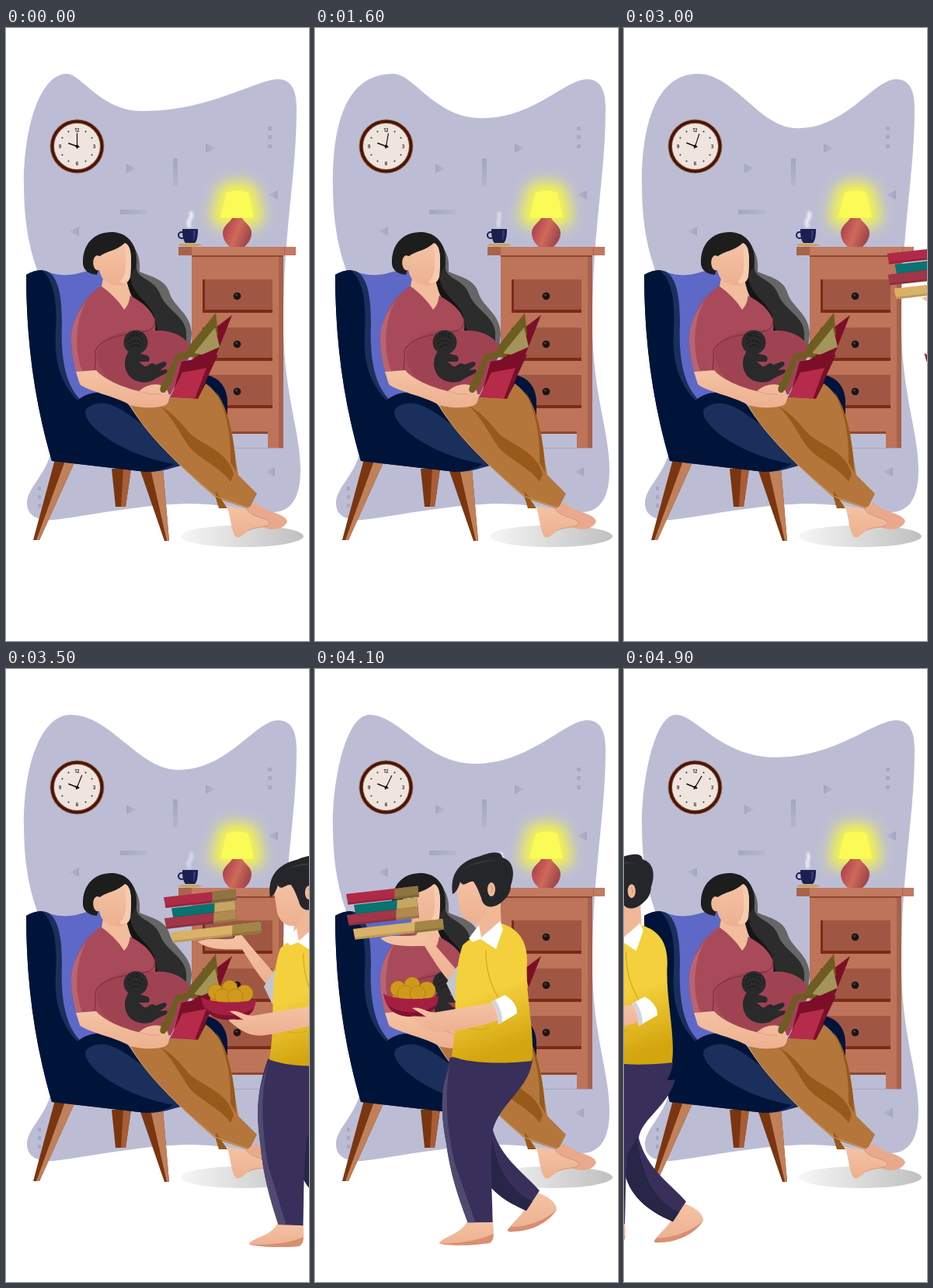
An HTML page that plays this animation: 390x790 px, repeating every 5000 ms.

```html
<!DOCTYPE html>
<html lang="en">
<head>
<meta charset="utf-8">
<title>Reading at home</title>
<style>
html, body { margin: 0; width: 100%; height: 100%; overflow: hidden; background: #fff; }
svg { display: block; width: 100vw; height: 100vh; }
text { font: bold 5.5px Inter, Arial, sans-serif; text-anchor: middle; fill: #222; }
</style>
</head>
<body>
<svg viewBox="0 0 390 790">
<defs>
  <linearGradient id="fade"><stop stop-color="#a4a6bf"/><stop offset="1" stop-color="#b6b7d0"/></linearGradient>
  <linearGradient id="fadeV" x2="0" y2="1"><stop stop-color="#a4a6bf"/><stop offset="1" stop-color="#b3b4ce"/></linearGradient>
  <linearGradient id="vase" y2=".4"><stop stop-color="#a3344b"/><stop offset=".6" stop-color="#cf6a5a"/><stop offset="1" stop-color="#a2494b"/></linearGradient>
  <linearGradient id="floor"><stop stop-color="#f6f6f6"/><stop offset="1" stop-color="#c0c0c0"/></linearGradient>
  <linearGradient id="skin" x2="0" y2="1"><stop stop-color="#f4c3a4"/><stop offset="1" stop-color="#edb090"/></linearGradient>
  <linearGradient id="gold" x2=".2" y2="1"><stop offset=".55" stop-color="#f4d03c"/><stop offset="1" stop-color="#d3a50f"/></linearGradient>
  <filter id="soft" x="-1" y="-1" width="3" height="3"><feGaussianBlur stdDeviation="1.5"/></filter>
  <filter id="halo" x="-2" y="-2" width="5" height="5"><feGaussianBlur stdDeviation="9"/></filter>
  <g id="drawer">
    <path fill="#7a2b17" d="M253 324h90v43h-90z"/><path fill="#9f5743" d="M256 324h87v39h-87z"/>
    <circle cx="297.5" cy="345.5" r="4.8" fill="#1c1514"/><circle cx="296.5" cy="344" r="1.6" fill="#4d3a36"/>
  </g>
  <path id="tri" fill="url(#fade)" d="M-6-6 7 0-6 6z"/>
  <path id="shade" d="M284 212q14-5 28 0l7 32q-21 2-43 0z"/>
</defs>

<path id="wall" fill="#bcbdd5"/>
<g id="deco">
  <use href="#tri" x="161" y="181"/><use href="#tri" x="263" y="155"/>
  <use href="#tri" transform="translate(88 262)rotate(180)"/>
  <use href="#tri" transform="translate(344 215)rotate(180)"/>
  <use href="#tri" transform="translate(340 572)rotate(180)"/>
  <path fill="url(#fadeV)" d="M215 168h6v36h-6z"/><path fill="url(#fade)" d="M147 234h35v6h-35z"/>
  <path fill="#a6a8c1" d="M337 127h5v5h-5zM337 138h5v5h-5zM337 150h5v5h-5zM41 591h4v5h-4zM41 602h4v5h-4zM41 613h4v5h-4z"/>
</g>

<g transform="translate(91.5 152.5)">
  <circle r="35" fill="#a8704f"/><circle r="34" fill="#45160d"/><circle r="30.500" fill="#8d4a32"/><circle r="29.500" fill="#efe4de"/>
  <g id="ticks" fill="#333"></g>
  <text y="-19">12</text><text x="22" y="2">3</text><text y="24">6</text><text x="-22" y="2">9</text>
  <path id="hour" stroke="#111" stroke-width="1.6" d="M0 3V-12"/>
  <path id="minute" stroke="#111" stroke-width="1.2" d="M0 3V-17"/><circle r="2" fill="#111"/>
</g>

<g>
  <path stroke="#a3a4bd" d="M284 541.5h74"/>
  <path fill="#bd7459" d="M239 290h118v251h-20v-18h-98z"/>
  <path fill="#a8614a" d="M351 293h6v248h-6z"/>
  <path fill="#8f4630" d="M239 292h118v3h-118zM239 520h98v3h-98z"/>
  <path fill="#c27a60" d="M222 282h151v11h-151z"/><path fill="#aa634b" d="M222 282h17v11h-17zM358 282h1v11h-1z"/>
  <use href="#drawer"/><use href="#drawer" y="62"/><use href="#drawer" y="123"/>
</g>

<use href="#shade" fill="#f3f350" stroke="#f3f350" stroke-width="24" stroke-linejoin="round" filter="url(#halo)"/>
<path fill="url(#vase)" d="M291 244h13c0 5 12 10 12 20 0 9-5 14-9 18h-19c-4-4-9-9-9-18 0-10 12-15 12-20z"/>
<use href="#shade" fill="#fbfb58"/>

<path id="steam" fill="none" stroke="#fff" stroke-width="5" opacity=".6" filter="url(#soft)"/>
<ellipse cx="237" cy="279.500" rx="15" ry="2" fill="#c6a363"/>
<circle cx="226" cy="267" r="4" fill="none" stroke="#1b1f50" stroke-width="2"/>
<path fill="#1b1f50" d="M227 259h20c0 9-1 15-4 18h-12c-3-3-4-9-4-18z"/><path fill="#343a78" d="M241 261h3q0 9-3 14z"/>

<ellipse cx="304" cy="655" rx="79" ry="14" fill="url(#floor)"/>

<g>
  <path fill="#7a3610" d="M136 568h25l-7 49h-13z"/><path fill="#a85d35" d="M151 568h10l-7 49h-6z"/>
  <path fill="#7a3610" d="M172 568h30l8 93h-6z"/><path fill="#c08059" d="M186 568h16l8 93h-3z"/>
  <path fill="#7a3610" d="M63 556 88 560 43 660h-8z"/><path fill="#c08059" d="M76 558 88 560 43 660h-4z"/>
  <path fill="#5e68c6" d="M48 312C85 328 100 309 125 310L155 340 150 500 97 485 65 440z"/>
  <path fill="#00133c" d="M250 447C273 446 285 463 285 482V520L255 530z"/>
  <path fill="#1a2f5c" d="M26 318C36 312 46 311 54 314 68 322 72 348 72 380 70 430 78 462 97 480 113 465 143 465 160 488 178 518 205 538 240 560L214 567Q200 572 180 572L59 558C36 480 26 400 26 318z"/>
  <path fill="#001439" d="M26 318C32 314 40 312 46 312 62 326 66 352 64 390 62 425 68 455 92 480 108 465 140 465 158 486 168 502 178 512 190 522 160 500 130 470 104 490 92 505 140 548 216 562Q200 572 180 572L59 558C36 480 26 400 26 318z"/>
</g>

<g>
  <path fill="#666" d="M150 270C172 283 173 300 172 314 183 320 206 322 211 343 217 360 238 368 239 394L237 412 200 402z"/>
  <path fill="#2c2c2c" d="M140 264C163 268 170 285 168 306 166 324 190 322 198 342 205 363 230 370 232 392L232 410 198 404 190 380C173 362 162 350 155 326z"/>
  <path fill="#151515" d="M160 320C162 345 185 352 191 372 194 385 196 395 200 405L190 400 188 382C173 362 160 350 155 326z"/>
  <path fill="#a94a5a" d="M123 332C102 345 86 370 84 400 84 418 88 432 90 443L116 441 117 450C140 466 180 474 212 470L238 418C236 400 217 389 192 390 195 372 184 358 160 345z"/>
  <path fill="#bb6471" d="M105 350C90 368 84 385 84 400 84 418 88 432 90 443L98 442C86 410 91 370 105 350z"/>
  <path fill="#9f4353" d="M117 418C130 388 162 388 192 390 218 389 238 402 239 418L212 472C170 476 116 460 117 418z"/>
  <path fill="none" stroke="#84303f" stroke-width="1.3" d="M114 441Q116 428 115 416C125 394 160 396 183 390Q194 386 191 373"/>
  <path fill="#f2bd9c" d="M125 322 123 333C133 340 144 350 152 363 158 357 159 350 160 343L155 325z"/>
  <path fill="#1d1d1d" d="M99 304C98 276 116 262 138 263 160 265 169 281 167 308L158 320 122 300 117 318C107 317 100 313 99 304z"/>
  <path fill="url(#skin)" d="M121 294C128 288 143 287 153 277 162 280 162 298 160 320 158 331 146 334 138 331 128 329 122 322 120 312 112 315 109 296 117 293z"/>
  <path fill="#f6cbb0" d="M153 278C162 280 162 300 160 320 157 331 146 331 147 326 157 318 154 300 153 278z"/>
</g>

<g fill="#2a2a2b">
  <circle cx="167" cy="405" r="15.500"/>
  <path d="M161 413C150 425 151 440 160 450 170 459 186 458 192 452L204 446Q209 444 207 440L198 441 206 435Q208 430 203 430L192 434C186 428 183 438 178 436L171 430 183 430Q187 425 182 422L174 420z"/>
  <path fill="none" stroke="#000" stroke-width=".9" stroke-dasharray="2 2" d="M157 402q9-11 20 0M158 407q9-9 18 1M160 396q7-5 14 0M161 411q6-5 12 0"/>
</g>

<g>
  <path fill="#7c0f28" d="M291 370 270 386 240 428 211 476 248 478z"/>
  <path fill="#7c0f28" d="M226 430 273 421 250 470 215 470z"/>
  <path fill="#b52b49" d="M227 444 258 438 243 478 211 476z"/>
  <path fill="#6e5c20" d="M270 367 273 395 245 424 230 424 237 408z"/>
  <path fill="#a3955a" d="M242 419 269 386 275 411 252 421z"/>
</g>

<g>
  <path fill="#b4763b" d="M160 486C185 490 202 487 211 476L247 478 257 458C282 476 291 510 295 552L299 576 323 600 313 620 271 606C240 580 180 525 160 486z"/>
  <path fill="#985a1b" d="M198 487C222 500 230 518 242 527 264 542 286 549 293 575L289 585C278 568 250 556 236 540 223 522 215 502 198 487zM270 468C286 490 291 520 295 552L296 572 289 560C290 525 284 495 270 468z"/>
  <path fill="#985a1b" d="M270 597 285 619 274 619 270 606z"/>
  <path fill="none" stroke="#d3a069" d="M160 486C180 525 240 580 271 604L313 619"/>
  <path fill="#e9a98d" d="M309 620 322 611C332 625 359 624 362 636 358 646 343 649 330 643z"/>
  <path fill="url(#skin)" d="M284 616 309 620C318 632 336 630 340 638 337 645 320 642 311 648 305 654 300 658 296 656 289 648 290 630 284 616z"/>
  <path fill="none" stroke="#d48f75" stroke-width=".9" d="M309 620C318 632 336 630 340 638 337 645 320 642 311 648"/>
</g>
<path fill="url(#skin)" d="M90 443 116 441C126 453 150 463 171 468 184 457 198 457 206 464 213 476 210 485 203 487 188 491 170 489 160 486 140 474 104 468 95 459z"/>
<path fill="none" stroke="#d99a7c" stroke-width=".8" d="M171 468Q183 473 197 472"/>
<path fill="#6e5c20" d="M219 420 243 416V423L222 428C217 446 212 462 204 470 196 471 198 463 201 458z"/>

<g id="man">
  <g id="rear">
    <path fill="url(#skin)" d="M284 674C300 678 312 689 311 697 300 713 280 725 250 725 244 722 259 712 269 698z"/>
    <path fill="#d88f72" d="M311 697C300 713 280 725 250 725 246 723 249 721 252 719 275 719 297 709 311 697z"/>
    <path fill="#38305a" d="M200 520 275 515C265 550 232 565 228 590 238 630 270 650 289 672L272 698C235 682 210 660 208 620z"/>
    <path fill="#272548" d="M226 590C230 630 245 670 280 686L272 698C235 682 210 660 208 620z"/>
  </g>
  <g id="front">
    <path fill="url(#skin)" d="M195 710H227C229 729 229 737 222 740 200 743 172 743 158 740 161 731 187 729 195 710z"/>
    <path fill="#d88f72" d="M158 740C180 740 205 738 228 728Q228 738 222 740C200 743 172 743 158 740z"/>
    <path fill="#38305a" d="M174 500 280 502C278 540 236 560 228 595 224 640 227 680 227 713H195C183 680 173 650 168 610 161 570 161 540 174 500z"/>
    <path fill="#514a70" d="M174 510C165 545 170 600 180 640L205 713H195C183 680 173 650 168 610 161 570 161 540 174 510z"/>
  </g>
  <path fill="url(#skin)" d="M84 347C98 341 120 346 130 343 137 329 143 343 153 354L184 390 174 404C162 391 150 371 141 357 120 357 98 359 84 347z"/>
  <path fill="#c4c5cf" d="M183 383 169 405 180 428 194 402z"/>
  <g id="books"></g>
  <path fill="url(#gold)" d="M190 356C198 348 214 338 240 328 260 334 273 348 273 376 270 420 284 470 279 505 245 509 200 509 176 499 185 450 175 400 190 356z"/>
  <path fill="none" stroke="#d4a719" stroke-width="1.2" d="M220 362Q219 395 236 424M183 455Q205 470 225 462"/>
  <path fill="#f0b897" d="M208 318 238 295 240 330 207 350z"/>
  <path fill="#fff" d="M198 347 211 330 214 346 238 325 242 335 233 361 213 348 203 352z"/>
  <path fill="url(#skin)" d="M182 282 190 273 222 268 234 290C231 305 220 311 212 325 201 331 189 322 186 309z"/>
  <path fill="#25262a" d="M177 290C173 262 188 247 213 241 233 233 241 237 241 243 255 247 258 262 252 279 252 290 245 298 235 304 225 309 216 306 214 295 211 288 209 281 204 274 198 272 191 283 187 274 185 282 181 289 177 290z"/>
  <path fill="#3b3d42" d="M188 260Q210 244 235 247 205 248 188 260z"/>
  <ellipse cx="227" cy="284" rx="5" ry="9" fill="#f0b897"/><path fill="none" stroke="#d28c70" d="M226 279q4 4 1 9"/>
  <path fill="#c48f1a" d="M100 408h50v16h-50z"/>
  <g fill="#cf9a1c" stroke="#a87912" stroke-width=".7"><circle cx="125" cy="407" r="10"/><circle cx="107" cy="412" r="10"/><circle cx="144" cy="414" r="11"/><circle cx="116" cy="418" r="10"/><circle cx="132" cy="418" r="10"/></g>
  <path fill="#a51f42" d="M88 418C98 427 148 427 159 421 158 440 145 448 125 448 103 448 91 438 88 418z"/>
  <path fill="#7e1230" d="M93 432C108 446 140 445 157 432 151 445 140 448 125 448 108 448 97 442 93 432z"/>
  <path fill="url(#skin)" d="M125 437C138 434 145 445 158 442L230 430 238 452C215 460 190 465 168 468 150 470 137 460 125 450 120 445 135 449 143 448z"/>
  <path fill="#fff" d="M227 429 244 420Q261 430 260 444L236 458Q236 440 227 429z"/>
  <path fill="#d3d3dc" d="M227 429 232 426Q242 442 241 455L236 458Q236 440 227 429z"/>
</g>
</svg>
<script>
const $ = id => document.getElementById(id);
const set = (id, name, value) => $(id).setAttribute(name, value);

for (let a = 0; a < 360; a += 30)
  if (a % 90) $('ticks').innerHTML += `<circle cy="-22" r="1" transform="rotate(${a})"/>`;

// left x, top y, width, page width, cover, pages
[[40, 290, 93, 30, '#b02a48', '#8d7440'], [50, 304, 82, 26, '#087371', '#c5a760'],
 [41, 317, 92, 28, '#a03748', '#b08a50'], [49, 335, 116, 36, '#d9b268', '#a28645']
].forEach(([x, y, w, p, cover, page]) => {
  $('books').innerHTML += `<g transform="translate(${x} ${y})rotate(-6.5)">
    <path fill="${cover}" d="M0 0h${w}v14H1z"/><path fill="${page}" d="M${w - p} 0h${p}v14h${-p - 2}z"/>
    <path fill="#0002" d="M0 11h${w}v3H1z"/></g>`;
});

// time, peak x, valley x, valley y
const keys = [[0, 78, 175, 107], [1000, 92, 205, 106], [2300, 112, 225, 128], [3500, 83, 222, 130],
  [4100, 70, 205, 122], [4500, 66, 205, 117], [5000, 67, 193, 113]];

function wall(t) {
  const i = keys.findIndex(k => k[0] > t), a = keys[i - 1], b = keys[i];
  const u = (t - a[0]) / (b[0] - a[0]);
  const [, p, v, y] = a.map((n, j) => n + (b[j] - n) * u);
  const d = v - p, k = Math.max(.2, .2 + (y - 114) * .011);
  return `M23 200C23 ${140 - (p - 67) * 1.35} ${40 + (p - 67) * .45} 59 ${p} 59
    C${p + d * k} 59 ${v - d * (.75 - k)} ${y} ${v} ${y}C${(v + 350) / 2} ${y} 320 67 350 66
    C368 66 374 81 374 104C374 190 357 260 357 380C357 470 379 520 379 570C379 605 367 623 345 624
    C310 624 280 612 230 613C160 616 105 629 60 634C38 635 27 627 27 612
    C27 590 60 570 60 530C60 440 60 370 40 312C27 275 23 240 23 200z`;
}

function draw(now) {
  const t = Math.floor(now % 5000 / 100) * 100;
  const phase = t / 1000 * 2 * Math.PI, c = Math.cos(phase), s = Math.sin(phase);
  set('wall', 'd', wall(t));
  set('hour', 'transform', `rotate(${-70 + t / 2000})`);
  set('minute', 'transform', `rotate(${t * .0062})`);
  const w = 3 * s;
  set('steam', 'd', `M237 257q${-4 - w} -6 0 -11t${w / 2} -9`);
  set('steam', 'opacity', .55 + .15 * c);
  set('man', 'transform', `translate(${(4100 - t) * .2715} ${2.5 - 1.7 * c - 1.8 * s})`);
  set('front', 'transform', `rotate(${1.5 - .6 * c - 2.5 * s} 225 510)`);
  set('rear', 'transform', `translate(${4 - 7 * s} ${3.8 + 2.8 * c - 10.2 * s})`);
  requestAnimationFrame(draw);
}
draw(0);
</script>
</body>
</html>
```
